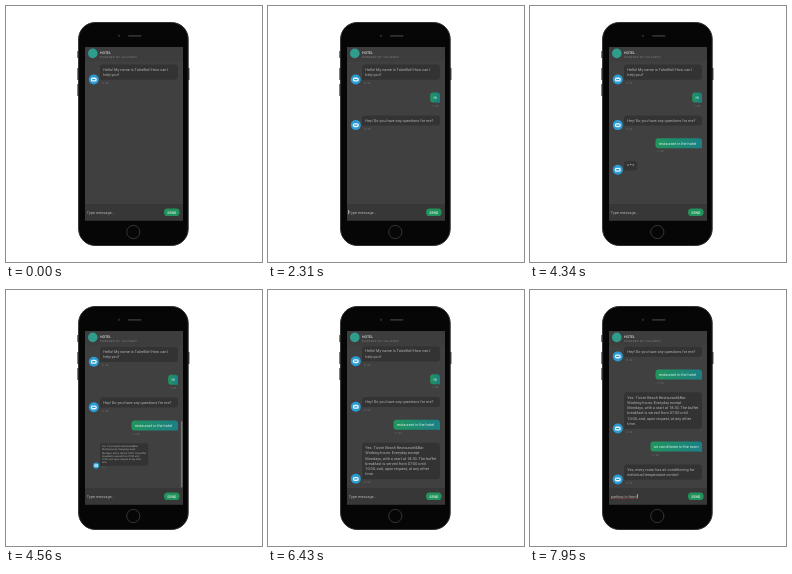
Write an HTML page that moves like this. It is 256 px wide and 256 px high and loops after 8 s.

```html
<!DOCTYPE html>
<html lang="en">
<head>
<meta charset="utf-8">
<title>Hotel chat</title>
<style>
  html, body { margin: 0; width: 100%; height: 100%; overflow: hidden; background: #fff; }
  svg { display: block; width: 100vw; height: 100vh; }
  text { font-family: Roboto, "Open Sans", sans-serif; font-size: 3.85px; fill: #b4b4b4; white-space: pre; text-rendering: geometricPrecision; }
  .time { font-size: 2.7px; fill: #747476; }
  .user text { fill: #d9f1e6; }
  .user .time { fill: #747476; }
</style>
</head>
<body>
<svg viewBox="0 0 256 256">
  <defs>
    <linearGradient id="green">
      <stop offset="0" stop-color="#21955d"/>
      <stop offset="1" stop-color="#1b7f86"/>
    </linearGradient>
    <clipPath id="view"><rect x="79" y="55.5" width="98" height="142.5"/></clipPath>
  </defs>

  <!-- phone -->
  <g fill="#2c2c2c">
    <rect x="71.4" y="45" width="2" height="7"/>
    <rect x="71.4" y="62" width="2" height="12"/>
    <rect x="71.4" y="78" width="2" height="12"/>
    <rect x="181.4" y="62" width="2" height="12"/>
  </g>
  <rect x="72.6" y="16.5" width="109.6" height="223" rx="16.5" fill="#060606" stroke="#303030"/>
  <circle cx="113" cy="29.8" r="1.2" fill="#25272c"/>
  <rect x="122" y="29" width="13.5" height="1.7" rx=".85" fill="#303032"/>
  <circle cx="127.3" cy="226" r="6.6" fill="#060606" stroke="#3c3c3c" stroke-width=".9"/>

  <!-- screen -->
  <rect x="79" y="41" width="98" height="173.5" fill="#404041"/>
  <g clip-path="url(#view)"><g id="chat"></g></g>
  <rect id="bar" x="174.9" y="131" width="1.5" height="66.5" rx=".75" fill="#77777a"/>
  <rect x="79" y="41" width="98" height="14.5" fill="#3d3d3e"/>
  <circle cx="86.8" cy="47.4" r="4.8" fill="#2f9c8c"/>
  <text x="94" y="47.9" style="font-size:3.6px;font-weight:500;fill:#d4d4d4">HOTEL</text>
  <text x="94" y="52.2" style="font-size:2.6px;letter-spacing:.45px;fill:#8d8d8f">POWERED BY TALVEBOT</text>

  <!-- input -->
  <rect x="79" y="198" width="98" height="16.5" fill="#373738"/>
  <text id="field" x="80.8" y="207.5"></text>
  <line id="squiggle" x1="80.8" y1="208.5" y2="208.5" stroke="#c8453c" stroke-width=".6" stroke-dasharray=".7 .5"/>
  <rect id="caret" y="204" width=".6" height="4.2" fill="#dcdcdc"/>
  <rect x="158" y="202.4" width="15.6" height="7.6" rx="3.6" fill="#22925c"/>
  <text x="165.8" y="207.5" text-anchor="middle" style="font-size:3.6px;font-weight:500;fill:#d8f0e3">SEND</text>
</svg>
<script>
const LOOP = 8000, LEFT = 94, RIGHT = 172, LINE = 5.3, GAP = 12.8, FLOOR = 189.7, GROW = 180;
const $ = id => document.getElementById(id);
const clamp = x => Math.max(0, Math.min(1, x));
const ramp = (t, from, length) => clamp((t - from) / length);
const heightOf = lines => lines * LINE + 4.7;

const messages = [
  { at: -1000, lines: ["Hello! My name is TalveBot! How can I", "help you?"] },
  { at: 1570, width: 9.8, lines: ["Hi"] },
  { at: 1870, dots: 1630, lines: ["Hey! Do you have any questions for me?"] },
  { at: 4160, width: 46.5, lines: ["restaurant in the hotel"] },
  { at: 4450, dots: 4230, lines: [
    "Yes. Tivorri Beach Restaurant&Bar.", "Working hours: Everyday except",
    "Mondays, with a start at 18:30. The buffet", "breakfast is served from 07:00 until",
    "10:00, and, upon request, at any other", "time."] },
  { at: 6430, width: 51.5, lines: ["air conditioner in the room"] },
  { at: 6690, dots: 6510, lines: ["Yes, every room has air conditioning for", "individual temperature control"] }
];

// keys: [time, typed characters]
const drafts = [
  { text: "Hi", focus: 870, keys: [[1280, 1], [1390, 2]], send: 1570 },
  { text: "restaurant in the hotel", focus: 2310, keys: [[2600, 1], [2760, 2], [3200, 12], [3560, 17], [3790, 18], [3970, 23]], send: 4160 },
  { text: "air conditioner in the room", focus: 4860, keys: [[5000, 1], [5660, 14], [5850, 15], [6280, 27]], send: 6430 },
  { text: "parking in front", focus: 7250, keys: [[7400, 1], [7950, 16]], send: LOOP + 1 }
];

function add(parent, name, attrs = {}, text) {
  const el = document.createElementNS("http://www.w3.org/2000/svg", name);
  for (const key in attrs) el.setAttribute(key, attrs[key]);
  if (text) el.textContent = text;
  parent.append(el);
  return el;
}

function addAvatar(parent, y) {
  add(parent, "circle", { cx: 87.8, cy: y, r: 5, fill: "#2b9bd3" });
  add(parent, "rect", { x: 84.8, y: y - 1.9, width: 6, height: 4, rx: 1.9, fill: "#eef7fc" });
  add(parent, "rect", { x: 86, y: y - .6, width: 3.6, height: 1.3, rx: .6, fill: "#2b9bd3" });
}

// Rounded box with one square bottom corner on the speaker's side.
function addBubble(parent, x, y, width, height, user) {
  const r = 3, fill = user ? "url(#green)" : "#333334";
  add(parent, "rect", { x, y, width, height, rx: r, fill });
  add(parent, "rect", { x: user ? x + width - r : x, y: y + height - r, width: r, height: r, fill: user ? "#1b7f86" : fill });
}

let rowY = 58.5;
const scrolls = [];
const scrollTo = (at, bottom) => scrolls.push({ at, to: Math.max(0, bottom - FLOOR) });

for (const m of messages) {
  const user = !!m.width, height = heightOf(m.lines.length);
  const width = m.width || RIGHT - LEFT, x = RIGHT - width;
  m.y = rowY;
  m.originX = user ? RIGHT : LEFT;
  m.grow = user ? 60 : GROW;
  m.group = add($("chat"), "g", { class: user ? "user" : "bot" });
  addBubble(m.group, x, rowY, width, height, user);
  m.lines.forEach((line, i) => add(m.group, "text", { x: x + 3.3, y: rowY + 6.3 + i * LINE }, line));
  add(m.group, "text", { class: "time", x: x + 1.5, y: rowY + height + 4.2 }, "11:30");
  if (!user) addAvatar(m.group, rowY + height - .3);
  if (m.dots) {
    m.wait = add($("chat"), "g");
    addBubble(m.wait, LEFT, rowY, 13.2, 9.4, false);
    addAvatar(m.wait, rowY + 8.7);
    m.balls = [0, 1, 2].map(i => add(m.wait, "circle", { cx: LEFT + 4 + i * 2.6, r: .75, fill: "#aaaaac" }));
    scrollTo(m.dots, rowY + heightOf(1));
  }
  scrollTo(m.at, rowY + height);
  rowY += height + GAP;
}

const show = (el, on) => el.setAttribute("display", on ? "inline" : "none");

function typedCount(keys, t) {
  let count = 0;
  keys.forEach(([at, n], i) => {
    if (t < at) return;
    const next = keys[i + 1];
    count = next ? n + Math.floor((next[1] - n) * ramp(t, at, next[0] - at) + 1e-6) : n;
  });
  return count;
}

function drawInput(t) {
  const draft = drafts.find(d => t >= d.focus && t < d.send);
  const count = draft ? typedCount(draft.keys, t) : 0;
  const field = $("field");
  field.textContent = count ? draft.text.slice(0, count) : "Type message...";
  const end = 80.8 + field.getComputedTextLength();
  show($("squiggle"), count > 2);
  $("squiggle").setAttribute("x2", end);
  show($("caret"), draft && (count || t < draft.focus + 260));
  $("caret").setAttribute("x", count ? end + .6 : 80.4);
}

function drawChat(t) {
  let scroll = 0;
  for (const s of scrolls) {
    const k = ramp(t, s.at, 80);
    scroll += (s.to - scroll) * k * (2 - k);
  }
  $("chat").setAttribute("transform", `translate(0 ${-scroll})`);

  for (const m of messages) {
    const k = ramp(t, m.at, m.grow);
    show(m.group, k > 0);
    m.group.setAttribute("transform", `translate(${m.originX} ${m.y}) scale(${k}) translate(${-m.originX} ${-m.y})`);
    if (!m.dots) continue;
    show(m.wait, t >= m.dots && t < m.at);
    m.balls.forEach((ball, i) =>
      ball.setAttribute("cy", m.y + 4.8 - Math.max(0, Math.sin((t - m.dots) / 45 - i * .9)) * 1.3));
  }
  const first = ramp(t, 4450, 60) * (1 - ramp(t, 4860, 200));
  const second = ramp(t, 6430, 60) * (1 - ramp(t, 7250, 200));
  $("bar").setAttribute("opacity", first + second);
}

function draw() {
  const t = performance.now() % LOOP;
  drawInput(t);
  drawChat(t);
  requestAnimationFrame(draw);
}
draw();
</script>
</body>
</html>
```
